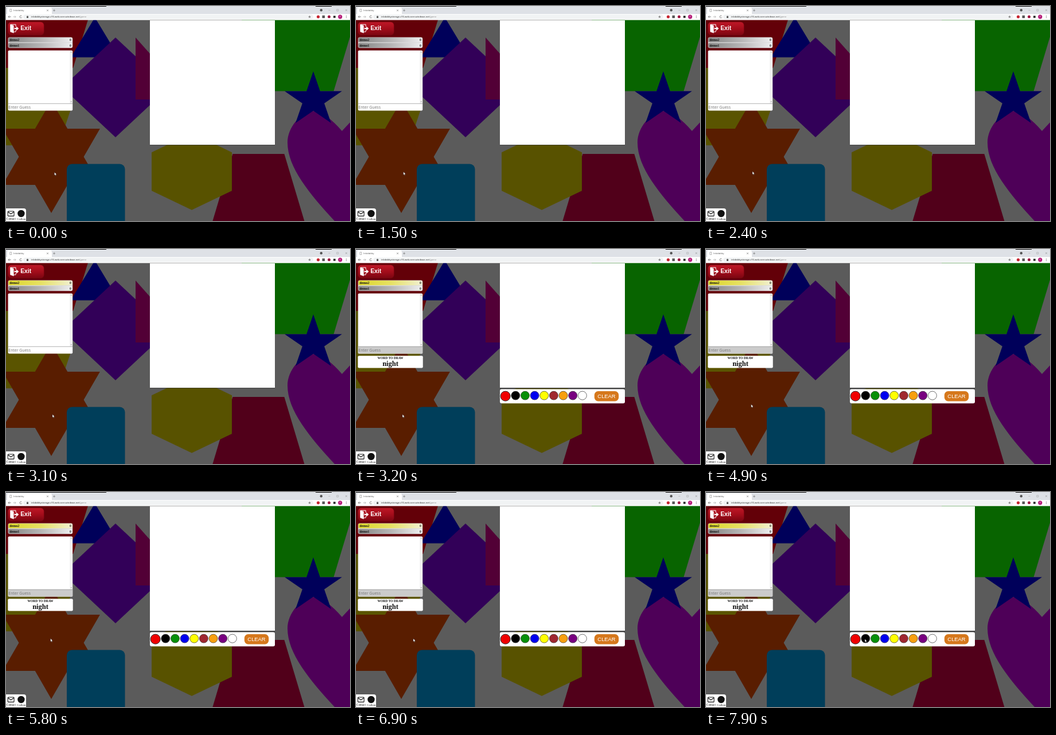
Write an HTML page with a canvas that moves like this. It is 600 by 375 pixels and loops after 8 s.

```html
<!DOCTYPE html>
<html lang="en">
<head>
<meta charset="utf-8">
<title>Drawing game</title>
<style>
html, body { margin: 0; width: 100%; height: 100%; overflow: hidden; background: #595959; }
canvas { display: block; width: 600px; height: 375px; }
</style>
</head>
<body>
<canvas id="stage"></canvas>
<script>
const canvas = document.getElementById('stage');
const ctx = canvas.getContext('2d');
const ratio = window.devicePixelRatio || 1;
canvas.width = 600 * ratio;
canvas.height = 375 * ratio;
ctx.scale(ratio, ratio);

const LOOP = 8000, TURN_AT = 3000, WORD_AT = 3200;
const SERIF = '"Liberation Serif", serif';
const SANS = '"Liberation Sans", sans-serif';
const UI = '"Open Sans", sans-serif';
const INK = '#111';

function rect(x, y, w, h, fill) {
  ctx.fillStyle = fill;
  ctx.fillRect(x, y, w, h);
}

function round(x, y, w, h, r, fill, edge, width = 0.6) {
  ctx.beginPath();
  ctx.roundRect(x, y, w, h, r);
  paint(fill, edge, width);
}

function disc(x, y, r, fill, edge, width = 0.7) {
  ctx.beginPath();
  ctx.arc(x, y, r, 0, Math.PI * 2);
  paint(fill, edge, width);
}

function paint(fill, edge, width) {
  if (fill) {
    ctx.fillStyle = fill;
    ctx.fill();
  }
  if (edge) {
    ctx.strokeStyle = edge;
    ctx.lineWidth = width;
    ctx.stroke();
  }
}

function poly(fill, ...p) {
  ctx.beginPath();
  for (let i = 0; i < p.length; i += 2) ctx.lineTo(p[i], p[i + 1]);
  ctx.closePath();
  paint(fill);
}

function line(color, width, ...p) {
  ctx.beginPath();
  for (let i = 0; i < p.length; i += 2) ctx.lineTo(p[i], p[i + 1]);
  paint(null, color, width);
}

// Regular polygon, or a star when an inner radius share is given
function ring(fill, cx, cy, n, rx, ry, inner) {
  const count = inner ? n * 2 : n;
  const p = [];
  for (let i = 0; i < count; i++) {
    const k = inner && i % 2 ? inner : 1;
    const a = i * 2 * Math.PI / count - Math.PI / 2;
    p.push(cx + k * rx * Math.cos(a), cy + k * ry * Math.sin(a));
  }
  poly(fill, ...p);
}

function trapezoid(fill, cx, top, bottom, wTop, wBottom) {
  poly(fill, cx - wTop / 2, top, cx + wTop / 2, top,
    cx + wBottom / 2, bottom, cx - wBottom / 2, bottom);
}

function plus(x, y, r, color, turn = 0) {
  ctx.save();
  ctx.translate(x, y);
  ctx.rotate(turn);
  line(color, 0.6, -r, 0, r, 0);
  line(color, 0.6, 0, -r, 0, r);
  ctx.restore();
}

function arrow(x, y, dir, color) {
  line(color, 0.7, x - 2.3 * dir, y, x + 2.3 * dir, y);
  line(color, 0.7, x + 0.3 * dir, y - 2, x + 2.3 * dir, y, x + 0.3 * dir, y + 2);
}

function text(str, x, y, font, fill, align = 'left') {
  ctx.font = font;
  ctx.textAlign = align;
  ctx.fillStyle = fill;
  ctx.fillText(str, x, y);
  return ctx.measureText(str).width;
}

function ramp(x0, y0, x1, y1, ...colors) {
  const g = ctx.createLinearGradient(x0, y0, x1, y1);
  colors.forEach((c, i) => g.addColorStop(i / (colors.length - 1), c));
  return g;
}

function heart() {
  ctx.beginPath();
  ctx.moveTo(586, 218);
  ctx.bezierCurveTo(570, 199, 550, 183, 533, 183);
  ctx.bezierCurveTo(514, 186, 491, 212, 491, 238);
  ctx.bezierCurveTo(491, 282, 530, 328, 574, 376);
  ctx.lineTo(600, 376);
  ctx.lineTo(600, 203);
  paint('#4e0058');
}

function backdrop() {
  rect(0, 24, 600, 351, '#5b5b5b');
  trapezoid('#630008', 50, 24, 108, 186, 134);
  poly('#5a5400', 0, 108, 116, 108, 112, 183, 92, 243, 0, 243);
  ring('#00005a', 155, 66.3, 3, 48.5, 46.3);
  ring('#320058', 191, 142, 4, 93, 87);
  poly('#520036', 226, 55, 322, 163, 226, 163);
  trapezoid('#086400', 510, 24, 148.4, 198, 123);
  heart();
  ring('#00005a', 536, 163.8, 5, 52.6, 49.8, 0.382);
  trapezoid('#51001a', 440.4, 258, 375, 90, 160);
  ring('#585200', 324, 288.8, 6, 80.8, 67);
  ring('#591d00', 79, 263, 6, 98, 98, 0.577);
  round(106, 275.5, 101.5, 110, 9, '#003e5a');
}

function browser() {
  rect(0, 0, 600, 14, '#dee1e6');
  rect(0, 0, 175, 1, '#000');
  rect(540, 0, 28, 1, '#000');
  round(2, 2.5, 78, 12, [3, 3, 0, 0], '#fff');
  rect(0, 14, 600, 10.5, '#fff');

  round(6.8, 5.6, 3, 4.2, 0, null, '#888');
  text('Inkdabby', 13, 9.3, '4.3px ' + UI, '#555');
  plus(72.5, 7.7, 2, '#666', Math.PI / 4);
  plus(84, 7.7, 2, '#666');

  disc(549.8, 7.3, 2.2, '#555');
  line('#999', 0.5, 562.5, 7.3, 565.5, 7.3);
  round(576.8, 5.8, 3, 3, 0, null, '#999', 0.5);
  plus(593.5, 7.3, 2, '#888', Math.PI / 4);

  arrow(6.3, 18.8, -1, '#555');
  arrow(14.8, 18.8, 1, '#aaa');
  ctx.beginPath();
  ctx.arc(26, 18.8, 2, 0.4, 5.5);
  paint(null, '#555', 0.7);
  round(30, 15, 506, 8, 4, '#f1f3f4');
  disc(37.5, 18, 1, null, '#555', 0.5);
  rect(36, 18, 3, 2.8, '#555');
  const font = '4.15px ' + UI;
  const w = text('inkdabbystorage.z16.web.core.windows.net', 44, 20.4, font, '#222');
  text('/game', 44 + w, 20.4, font, '#888');

  ring('#888', 529.5, 18.9, 5, 2.6, 2.6, 0.45);
  disc(544.5, 18.8, 2.6, '#c62530');
  rect(551.5, 16.5, 4.6, 4.6, '#555');
  disc(563.5, 18.8, 2.5, '#a01842');
  rect(571, 17, 3.8, 3.8, '#333');
  disc(582.8, 18.8, 3.6, '#b51a78');
  text('F', 582.8, 20.3, '4px ' + UI, '#fff', 'center');
  for (let y = 17; y < 22; y += 1.8) disc(593.5, y, 0.5, '#444');
}

function exitButton() {
  round(3.3, 27.8, 63, 23.2, 6, ramp(0, 28, 0, 51, '#bd1726', '#a30d1b', '#7b0611'), '#780611');
  round(8, 32.2, 9, 12.8, 0, null, '#fff', 1);
  poly('#fff', 7.5, 32, 13.5, 34, 13.5, 47.5, 7.5, 45);
  rect(14.5, 36, 4, 6, '#a30d1b');
  rect(14.5, 38, 4, 2.4, '#fff');
  poly('#fff', 18, 35.5, 22.3, 39.2, 18, 43);
  text('Exit', 25.2, 42.2, 'bold 10.3px ' + SANS, '#fff');
}

function player(name, y, fill) {
  round(4.3, y, 111.4, 8.2, 2, fill);
  text(name, 6.2, y + 6.2, 'bold 6px ' + SERIF, INK);
  text('0', 113.8, y + 6.1, 'bold 5.6px ' + SERIF, '#222', 'right');
}

function chat(locked) {
  round(3.6, 77.4, 112.6, 105, 2, '#fff');
  rect(111.3, 78, 4.7, 92, '#f0f0f0');
  ring('#999', 113.7, 80.4, 3, 1.2, 1.2);
  ring('#999', 113.7, 166.8, 3, 1.2, -1.2);
  if (locked) rect(3.6, 170, 112.6, 12.4, '#cbcbcb');
  rect(3.6, 169.8, 112.6, 0.7, '#8c8c8c');
  text('Enter Guess', 4.3, 179, '6.9px ' + UI, '#757575');
}

function contact() {
  round(0, 353, 35, 24, [0, 4, 0, 0], '#fff');
  round(3.2, 358, 10.8, 8.4, 1, null, INK, 1.1);
  line(INK, 1.1, 3.5, 359, 8.6, 362.7, 13.7, 359);
  disc(26.4, 362, 6.2, INK);
  text('Contact', 1, 372.8, '5.1px ' + SERIF, INK);
  text('Codlum', 19, 372.8, '4.8px ' + SERIF, INK);
}

function sidebar(turn, word) {
  exitButton();
  const grey = ramp(4, 0, 116, 0, '#858585', '#b5b5b5', '#f0f0f0');
  const gold = ramp(4, 0, 116, 0, '#dcd72c', '#e6e162', '#f1f0d4');
  round(3.6, 54.5, 112.6, 18.8, 3, '#dcdcdc');
  player('demo2', 55, turn ? gold : grey);
  player('demo1', 64.5, grey);
  chat(word);
  if (word) {
    round(3.3, 186.2, 113.4, 21.2, 2, '#fff');
    text('WORD TO DRAW', 60, 191.6, 'bold 5.5px ' + SERIF, INK, 'center');
    text('night', 60, 204.3, 'bold 12.4px ' + SERIF, INK, 'center');
  }
  contact();
}

function board(word) {
  rect(251, 25, 218, 217, '#fff');
  rect(251, 242, 218, word ? 1.3 : 0.6, '#333');
  if (!word) return;
  round(251, 244.6, 218, 24.6, 3, '#fff');
  disc(260.6, 256.6, 8.5, '#f00000', '#222', 1);
  const paints = ['#000', '#089008', '#0000f0', '#ffff00', '#a02830', '#f7a010', '#780080', '#fff'];
  paints.forEach((c, i) => disc(278.3 + i * 16.65, 255.6, 7.5, c, '#333'));
  round(415.8, 248, 42.4, 17.5, 6.5, '#d6781c');
  text('CLEAR', 437, 259.6, '9.4px ' + SANS, '#fff', 'center');
}

// Progress from 0 to 1 between two times; a higher power starts slower
function ease(t, from, to, power = 1) {
  return Math.min(1, Math.max(0, (t - from) / (to - from))) ** power;
}

function pointer(t) {
  const drift = ease(t, 600, 2400);
  const lift = ease(t, 3300, 4000);
  const back = ease(t, 4000, 5000);
  const rise = ease(t, 5000, 5800);
  const sweep = ease(t, 6400, 7900, 2);
  ctx.save();
  ctx.translate(
    84.5 - 3.5 * drift + 7 * lift - 10.3 * back + 199.3 * sweep,
    290 - 1.5 * drift - 9 * lift - 9.5 * back - 14.4 * rise + 0.8 * sweep
  );
  const shape = [0, 0, 0, 5.3, 1.2, 4.3, 2, 6.1, 2.9, 5.7, 2.1, 4, 3.7, 3.8];
  poly('#fff', ...shape);
  line('#222', 0.35, ...shape, 0, 0);
  ctx.restore();
}

function draw(t) {
  const word = t >= WORD_AT;
  backdrop();
  browser();
  sidebar(t >= TURN_AT, word);
  board(word);
  pointer(t);
}

const start = performance.now();
function tick() {
  draw((performance.now() - start) % LOOP);
  requestAnimationFrame(tick);
}
tick();
</script>
</body>
</html>
```
